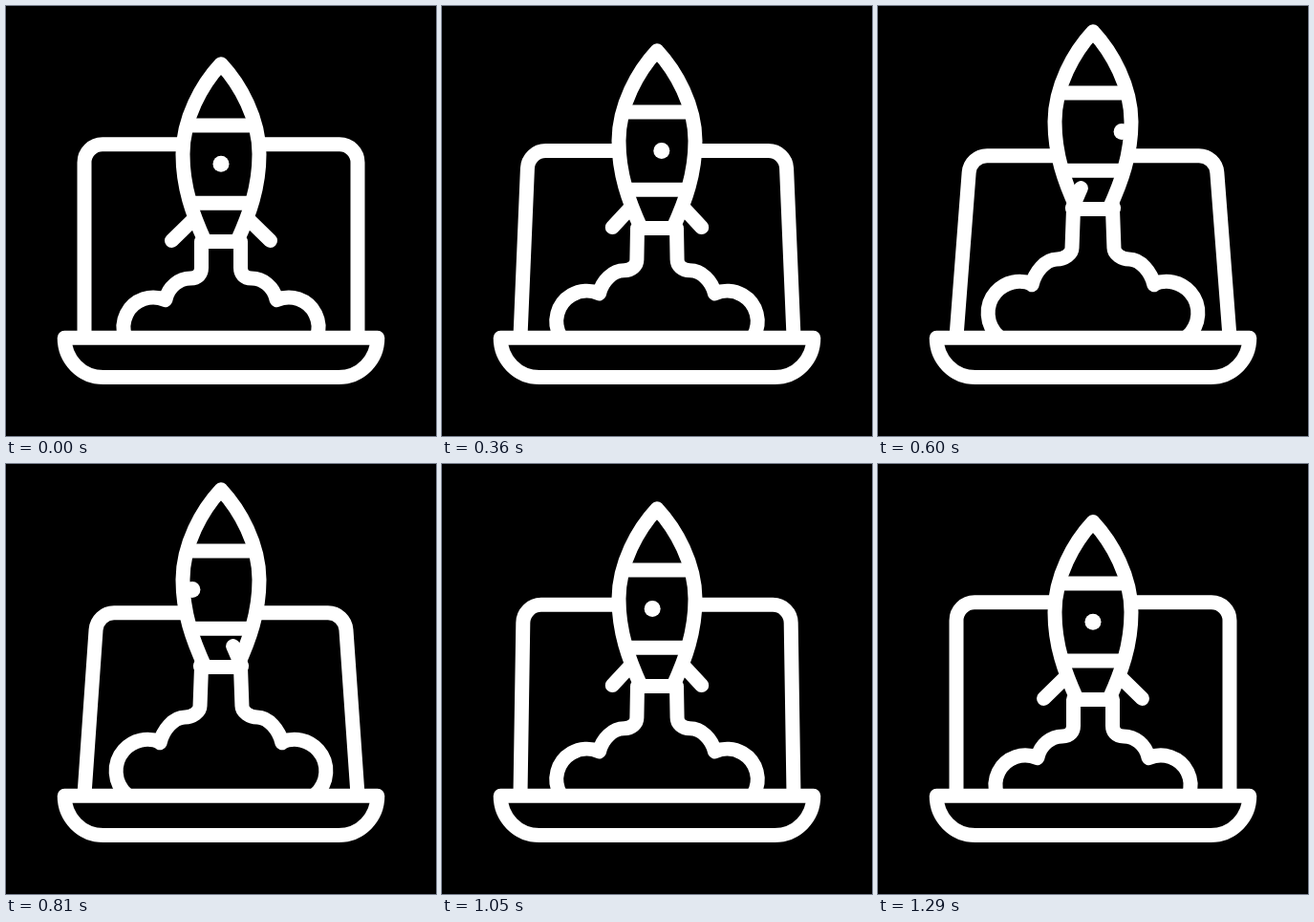
Animation, 450 px wide and 450 px high, one loop 1.5 s. Source, as an HTML page with a canvas:

```html
<!DOCTYPE html>
<html lang="en">
<head>
<meta charset="utf-8">
<title>Rocket launch</title>
<style>
  html, body { margin: 0; width: 100%; height: 100%; overflow: hidden; background: #000; }
  canvas { display: block; }
</style>
</head>
<body>
<canvas id="stage" width="450" height="450"></canvas>
<script>
const ctx = document.getElementById('stage').getContext('2d');
const LOOP = 1500, STEP = 30, CENTER = 225, STROKE = 15;

const mix = (a, b, k) => a + (b - a) * k;

// Cubic ease-in-out between two times.
function ease(t, start, end) {
  const u = Math.min(1, Math.max(0, (t - start) / (end - start)));
  return u < 0.5 ? 4 * u ** 3 : 1 - 4 * (1 - u) ** 3;
}

function line(x1, y1, x2, y2) {
  ctx.beginPath();
  ctx.moveTo(x1, y1);
  ctx.lineTo(x2, y2);
  ctx.stroke();
}

function mirrored(draw) {
  draw();
  ctx.save();
  ctx.translate(2 * CENTER, 0);
  ctx.scale(-1, 1);
  draw();
  ctx.restore();
}

function drawScreen(tilt) {
  const x = 82 + 14.5 * tilt, y = 144.8 + 12 * tilt;
  mirrored(() => {
    ctx.beginPath();
    ctx.moveTo(82, 346);
    ctx.arcTo(x, y, CENTER, y, 19);
    ctx.lineTo(CENTER, y);
    ctx.stroke();
  });
}

function drawSmoke(lift, top) {
  const at = (a, b) => mix(a, b, lift);
  const cx = at(154, 148), cy = at(336, 321), r = at(31, 33);
  const notchX = at(167, 161), notchY = at(307, 291.5);
  const puffX = at(193, 187), puffY = at(285, 264.7);
  const stemX = at(204.5, 203), stemY = at(274, 253);
  const bottom = Math.PI - Math.asin((346 - cy) / r);
  mirrored(() => {
    ctx.beginPath();
    ctx.arc(cx, cy, r, bottom, Math.atan2(notchY - cy, notchX - cx) + 2 * Math.PI);
    ctx.lineTo(notchX, notchY);
    ctx.bezierCurveTo(notchX + 3, notchY - 13, puffX - 12, puffY, puffX, puffY);
    ctx.bezierCurveTo(puffX + 8, puffY, stemX, stemY + 6, stemX, stemY);
    ctx.lineTo(204.5, top);
    ctx.stroke();
  });
}

function hullPath() {
  const path = new Path2D();
  path.moveTo(208.3, 246.5);
  path.bezierCurveTo(195.3, 218, 185, 190, 185, 155);
  path.bezierCurveTo(185, 118, 205, 82, 225, 60.7);
  path.bezierCurveTo(245, 82, 265, 118, 265, 155);
  path.bezierCurveTo(265, 190, 254.7, 218, 241.7, 246.5);
  path.closePath();
  return path;
}
const hull = hullPath();

// A fin slides from one side of the hull to the other; side is -1 or 1.
function drawFin(side, spin) {
  const reach = side * (1 - 2 * spin);
  line(CENTER + 30 * reach, 224.5, CENTER + 51.5 * reach, 245.5);
}

function drawRocket(rise, spin) {
  ctx.save();
  ctx.translate(0, -rise);
  drawFin(1, spin);
  ctx.fillStyle = '#000';
  ctx.fill(hull);

  ctx.save();
  ctx.clip(hull);
  ctx.fillStyle = '#fff';
  ctx.beginPath();
  ctx.arc(CENTER + 104 * (spin > 0.5 ? spin - 1 : spin), 165.3, 8.5, 0, 2 * Math.PI);
  ctx.fill();
  ctx.restore();

  ctx.stroke(hull);
  line(192, 125, 258, 125);
  line(194, 206.2, 256, 206.2);
  drawFin(-1, spin);
  ctx.restore();
}

function drawBase() {
  ctx.beginPath();
  ctx.moveTo(61.2, 347.3);
  ctx.lineTo(388.8, 347.3);
  ctx.bezierCurveTo(388.8, 370, 371, 388.5, 348, 388.5);
  ctx.lineTo(102, 388.5);
  ctx.bezierCurveTo(79, 388.5, 61.2, 370, 61.2, 347.3);
  ctx.closePath();
  ctx.stroke();
}

function render(t) {
  const lift = ease(t, 60, 705) - ease(t, 705, 1350);
  const tilt = ease(t, 75, 620) - ease(t, 620, 1310);
  const spin = ease(t, 75, 1335);
  const rise = 34.5 * lift;

  ctx.fillStyle = '#000';
  ctx.fillRect(0, 0, 450, 450);
  ctx.strokeStyle = '#fff';
  ctx.lineWidth = STROKE;
  ctx.lineCap = ctx.lineJoin = 'round';

  drawScreen(tilt);
  drawSmoke(lift, 246.5 - rise);
  drawRocket(rise, spin);
  drawBase();
}

function tick() {
  const t = performance.now() % LOOP;
  render(Math.floor(t / STEP) * STEP);
  requestAnimationFrame(tick);
}
tick();
</script>
</body>
</html>
```
